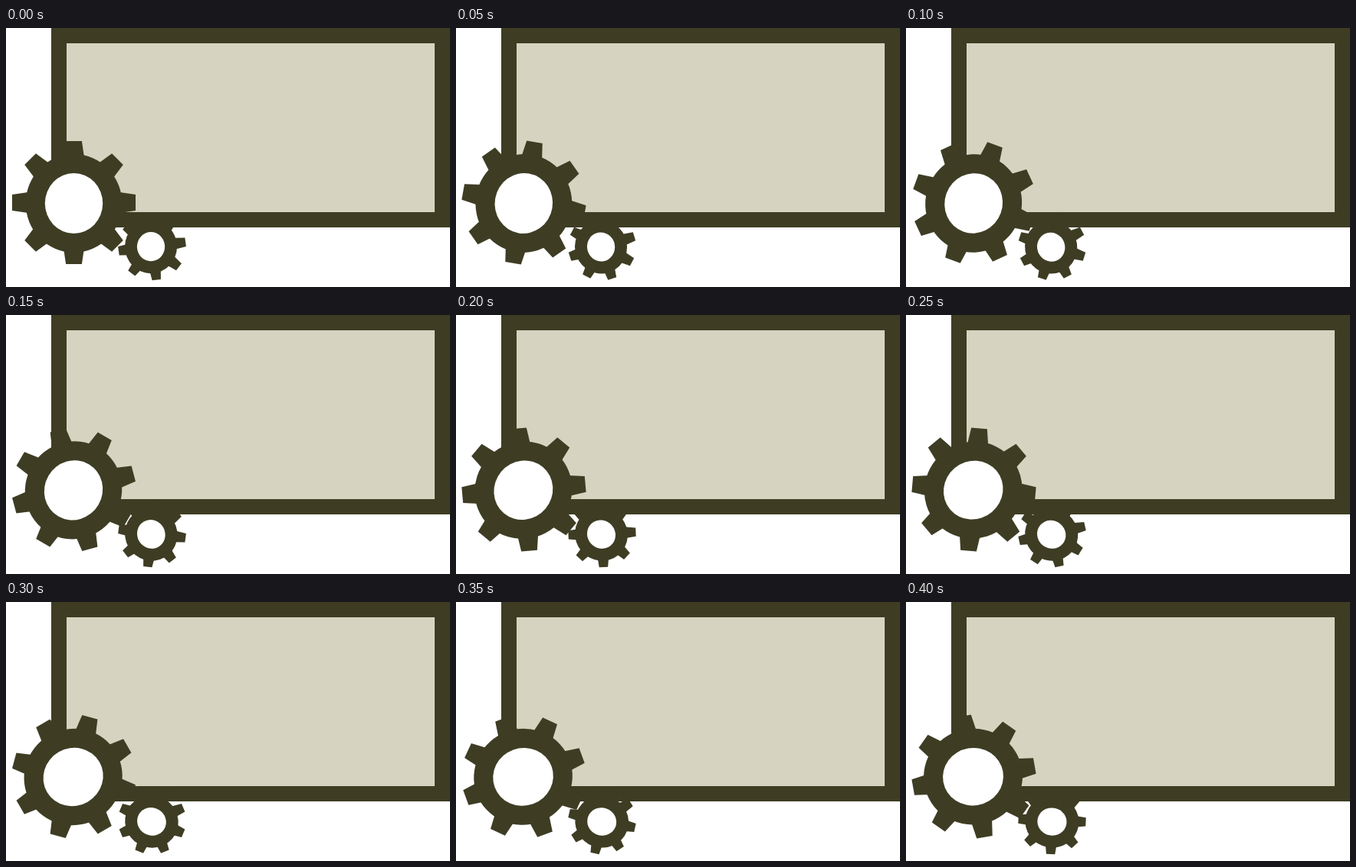
Animation, 579 px wide and 339 px high, one loop 0.45 s. Source, as an HTML page with a canvas:

```html
<!DOCTYPE html>
<html lang="en">
<head>
<meta charset="utf-8">
<title>Gears and panel</title>
<style>
  html, body { margin: 0; width: 100%; height: 100%; overflow: hidden; background: #fff; }
  canvas { display: block; width: 579px; height: 339px; }
</style>
</head>
<body>
<canvas id="stage" width="579" height="339"></canvas>
<script>
const ctx = document.getElementById('stage').getContext('2d');
const DARK = '#3e3d24', PANEL = '#d6d4c0', WHITE = '#fff';
const STEP_MS = 50, STEPS = 9, STEP_DEG = 10, TEETH = 8;
const rad = deg => deg * Math.PI / 180;

// Body and hole sit slightly off the axis (dx, dy), so they wobble as the gear turns.
const gears = [
  { x: 88.5, y: 228.5, dir: 1, phase: 0, dx: 0, dy: 1,
    body: [62.8, 64.5], hole: [37.7, 39.5],
    tooth: { tip: 80.5, tipHalf: 10.4, base: 60, baseHalf: 13.4 } },
  { x: 190.5, y: 286, dir: -1, phase: -7.5, dx: -1.5, dy: 0.2,
    body: [34, 35], hole: [18.1, 19.1],
    tooth: { tip: 44, tipHalf: 5.7, base: 32, baseHalf: 7.2 } }
];

function rect(x, y, w, h, color) {
  ctx.fillStyle = color;
  ctx.fillRect(x, y, w, h);
}

function oval(g, [rx, ry], color) {
  ctx.fillStyle = color;
  ctx.beginPath();
  ctx.ellipse(g.dx, g.dy, rx, ry, 0, 0, 2 * Math.PI);
  ctx.fill();
}

function drawTooth(t, angle) {
  ctx.save();
  ctx.rotate(angle);
  ctx.beginPath();
  ctx.moveTo(0, 0);
  ctx.lineTo(t.base, -t.baseHalf);
  ctx.lineTo(t.tip, -t.tipHalf);
  ctx.lineTo(t.tip, t.tipHalf);
  ctx.lineTo(t.base, t.baseHalf);
  ctx.fill();
  ctx.restore();
}

function drawGear(g, step) {
  ctx.save();
  ctx.translate(g.x, g.y);
  ctx.rotate(rad(g.dir * STEP_DEG * step));
  oval(g, g.body, DARK);
  for (let i = 0; i < TEETH; i++) drawTooth(g.tooth, rad(g.phase + i * 360 / TEETH));
  oval(g, g.hole, WHITE);
  ctx.restore();
}

function draw() {
  const step = Math.floor(performance.now() / STEP_MS) % STEPS;
  rect(0, 0, 579, 339, WHITE);
  rect(59, 0, 520, 261, DARK);
  rect(79, 20, 480, 221, PANEL);
  gears.forEach(g => drawGear(g, step));
  requestAnimationFrame(draw);
}
draw();
</script>
</body>
</html>
```
